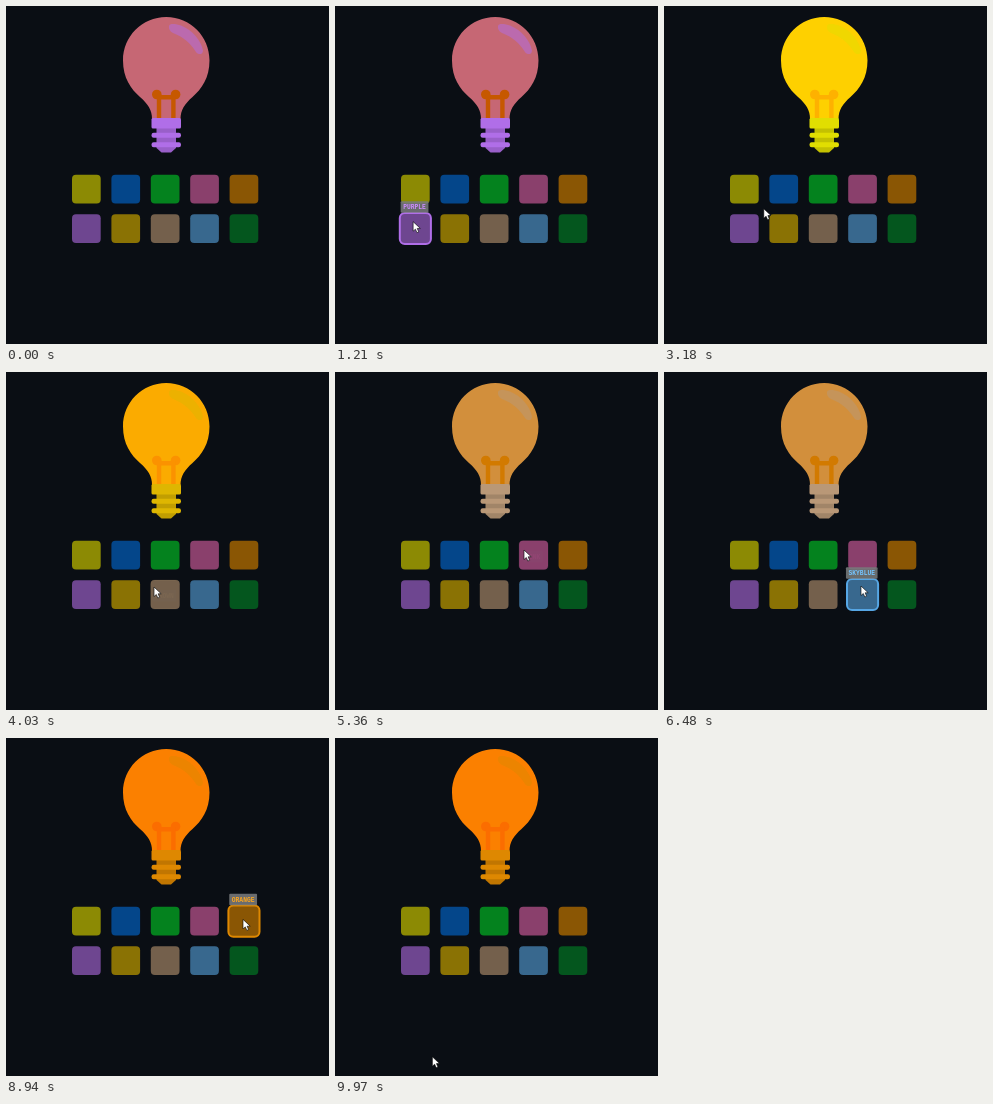
These frames come from a looping animation (323x338 px, 10 s). An HTML page:

```html
<!DOCTYPE html>
<html lang="en">
<head>
<meta charset="utf-8">
<title>Bulb colour picker</title>
<style>
  html, body { margin: 0; height: 100%; overflow: hidden; background: #0a0e14; }
  svg { display: block; width: 100vw; height: 100vh; }
  text { font: bold 6.3px "Liberation Mono", "DejaVu Sans Mono", monospace; text-anchor: middle; }
</style>
</head>
<body>
<svg viewBox="0 0 323 338">
  <g id="bulb">
    <path data-part="glass" d="M160.200 11C136 11 117 30.500 117 54.500C117 72 125 83 134 91C142 98 146 104 146 113H174.500C174.500 104 178.500 98 186.500 91C195.500 83 203.500 72 203.500 54.500C203.500 30.500 184.500 11 160.200 11Z"/>
    <path data-part="shine" d="M163 20C163 17 170 17.500 175 19.500C186 24 195 34 197 44.500C197 49 192 49 190 46C185 38 178 31 167 27C164 25.500 162.500 23 163 20Z"/>
    <g data-part="wire">
      <circle cx="150.800" cy="88.500" r="4.800"/>
      <circle cx="169.600" cy="88.500" r="4.800"/>
      <path d="M150.800 89H169.600V112H165.200V93.500H155.200V112H150.800Z"/>
    </g>
    <path data-part="neck" d="M150.500 120H170V142L165 146.500H155.500L150.500 142Z"/>
    <g data-part="base">
      <rect x="145.500" y="112" width="29.500" height="10.500" rx="1.500"/>
      <rect x="145.500" y="126.700" width="29.500" height="5" rx="2.200"/>
      <rect x="145.500" y="136.300" width="29.500" height="5" rx="2.200"/>
    </g>
  </g>
  <g id="swatches"></g>
  <g id="tip">
    <rect height="11.500" rx="1" fill="#777a7c" fill-opacity=".88"/>
    <text y="8"></text>
  </g>
  <path id="cursor" d="M0 0V9.500L2.300 7.500L3.800 11L5.600 10.200L4.100 6.800H7.200Z" fill="#fff" stroke="#000" stroke-width=".6"/>
</svg>
<script>
const LOOP = 10000, SIZE = 28.7, GAP = 39.4, FADE = 250, RISE = 180;
const $ = id => document.getElementById(id);
const clamp = v => Math.max(0, Math.min(1, v));
const mix = (a, b, k) => a + (b - a) * k;
const blend = (a, b, k) => a.map((v, i) => mix(v, b[i], k));
const rgb = c => `rgb(${c.map(v => Math.round(255 * clamp(v / 255)))})`;
const set = (el, attrs) => Object.entries(attrs).forEach(([k, v]) => el.setAttribute(k, v));

const palette = {
  YELLOW: '8c8a04', BLUE: '04468a', GREEN: '04821e', PINK: '8a406c', ORANGE: '8a5604',
  PURPLE: '6e4690', GOLD: '8a7204', BROWN: '74604c', SKYBLUE: '38688e', DARKGREEN: '04561e'
};

const swatches = Object.entries(palette).map(([name, hex], i) => {
  const el = document.createElementNS('http://www.w3.org/2000/svg', 'rect');
  el.setAttribute('fill', '#' + hex);
  $('swatches').append(el);
  const bright = hex.match(/../g).map(v => parseInt(v, 16) * 1.65 - 6);
  return { name, el, bright, x: 66 + i % 5 * GAP, y: 168.8 + Math.floor(i / 5) * GAP };
});

const swatchAt = (x, y) =>
  swatches.find(s => x >= s.x && x <= s.x + SIZE && y >= s.y && y <= s.y + SIZE);

// Pointer stops: time, x, y and whether the swatch there is clicked
const stops = [
  [0, 96, 297], [700, 78, 228], [1100, 78, 224], [1950, 79, 160], [2210, 79, 166.5],
  [2850, 82, 184, true], [3520, 118, 222, true], [3700, 118, 222], [4030, 148, 215],
  [4450, 158, 220, true], [5200, 176, 137], [5360, 189, 178], [5800, 198, 188],
  [6350, 197, 214], [6600, 197, 214, true], [7050, 236, 222, true], [7760, 237, 213],
  [7940, 236.7, 185], [8150, 237, 182, true], [9420, 237, 181], [LOOP, 90, 326]
];
const clicks = stops.filter(s => s[3]).map(([time, x, y]) => ({ time, color: swatchAt(x, y).bright }));
const firstColor = swatches.find(s => s.name === 'PURPLE').bright;

function pointer(t) {
  const i = stops.findIndex(s => s[0] > t);
  const [t0, x0, y0] = stops[i - 1], [t1, x1, y1] = stops[i];
  return blend([x0, y0], [x1, y1], (t - t0) / (t1 - t0));
}

const hovered = t => swatchAt(...pointer(t));

function hoverAge(t, swatch) {
  let age = 0;
  while (age < RISE && t > age + 2 && hovered(t - age) === swatch) age += 2;
  return age;
}

const bulbColor = t => clicks.reduce(
  (color, click) => blend(color, click.color, clamp((t - click.time) / FADE)), firstColor);

function drawBulb(base) {
  const tint = (r, g, b) => [base[0] * r, base[1] * g, base[2] * b];
  const glass = tint(1.13, .94, .5);
  const parts = {
    base, glass, shine: blend(glass, base, .5), wire: tint(1.13, .8, 0), neck: tint(.87, .87, .87)
  };
  for (const el of $('bulb').children) el.setAttribute('fill', rgb(parts[el.dataset.part]));
}

function drawSwatch(s, shown) {
  const grow = 1.2 * shown, side = SIZE + 2 * grow;
  set(s.el, {
    x: s.x - grow, y: s.y - grow, width: side, height: side, rx: 4 + shown,
    stroke: rgb(s.bright), 'stroke-width': 2 * shown
  });
}

function drawTip(s, age, shown) {
  $('tip').setAttribute('opacity', shown);
  if (!s) return;
  const [box, label] = $('tip').children;
  const width = s.name.length * 3.8 + 5;
  const lift = mix(16, -13, clamp(age / RISE));
  set($('tip'), { transform: `translate(${s.x + SIZE / 2 - .8} ${s.y + lift})` });
  set(box, { x: -width / 2, width });
  label.textContent = s.name;
  label.setAttribute('fill', rgb(s.bright.map(v => v + 30)));
}

function draw(t) {
  drawBulb(bulbColor(t));
  const active = hovered(t), age = active ? hoverAge(t, active) : 0;
  const shown = clamp((age - 35) / 45);
  swatches.forEach(s => drawSwatch(s, s === active ? shown : 0));
  drawTip(active, age, shown);
  set($('cursor'), {
    transform: `translate(${pointer(t)})`, visibility: t < 30 ? 'hidden' : 'visible'
  });
}

const start = performance.now();
function frame() {
  draw(Math.max(0, performance.now() - start) % LOOP);
  requestAnimationFrame(frame);
}
frame();
</script>
</body>
</html>
```
